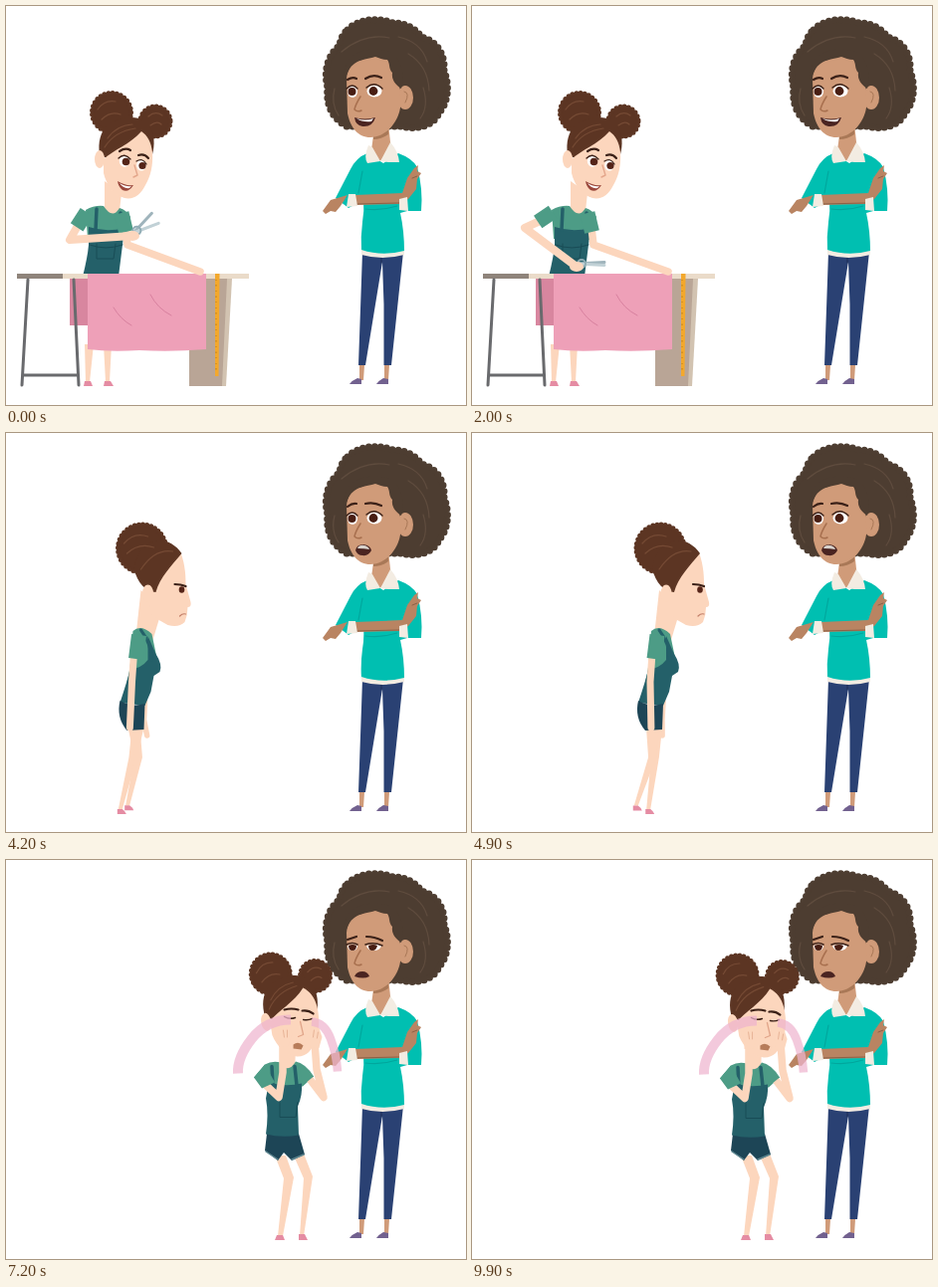
Animation of 462x401 px, one loop 10 s. Source, as an HTML page:

```html
<!DOCTYPE html>
<html lang="en">
<head>
<meta charset="utf-8">
<title>Two women</title>
<style>
html, body { margin: 0; width: 100%; height: 100%; overflow: hidden; background: #fff; }
svg { display: block; width: 462px; height: 401px; }
.line { fill: none; stroke-linecap: round; stroke-linejoin: round; }
.skin { fill: #fcd6bd; }
.limb { fill: none; stroke: #fcd6bd; stroke-linecap: round; stroke-linejoin: round; }
.tan { fill: #d09b79; }
.arm { fill: #b98462; }
.hair { fill: #5c3523; }
.curl { fill: #5c3523; stroke: #5c3523; stroke-width: 5; stroke-linecap: round; stroke-dasharray: 0 4.2; }
.shirt { fill: #4d9c86; }
.sleeve { fill: none; stroke: #4d9c86; stroke-width: 15; }
.apron { fill: #246069; }
.shorts { fill: #1d4556; }
.teal { fill: #00bfb1; }
.cream { fill: #f3ece2; }
.jeans { fill: #2a4173; }
.shoe { fill: #e58ca3; }
.brow { fill: none; stroke: #3b2118; stroke-width: 2.2; stroke-linecap: round; }
.tear { fill: none; stroke: #efb5cf; stroke-opacity: .72; stroke-linejoin: round; }
</style>
</head>
<body>
<svg viewBox="0 0 462 401">
  <defs>
    <g id="girlHead">
      <circle class="curl" cx="106" cy="107" r="19.5"/>
      <circle class="curl" cx="150" cy="116" r="15"/>
      <path class="line" stroke="#754a34" stroke-width="1.2" d="M92 104q7-10 18-8M96 114q9-9 19-5M143 111q7-6 14-1M145 120q7-5 11-1"/>
      <path class="hair" d="M94 150C90 122 107 112 126 112 145 112 152 130 147 149L120 160Z"/>
      <ellipse class="skin" cx="94" cy="154" rx="5" ry="9"/>
      <path class="skin" d="M98 154C107 145 125 139 136 126 142 130 146 137 147 147 148 160 145 172 140 180 135 190 128 195 119 193 108 190 101 180 98 168Z"/>
      <path class="line" stroke="#754a34" stroke-width="1.2" d="M102 133q9-13 25-14M99 142q10-16 31-19"/>
    </g>
  </defs>

  <g id="table">
    <path class="skin" d="M79 340h9l-4 38h-4zM98 340h8l-2 38h-4z"/>
    <path class="shoe" d="M79 377h6l2 5h-9zM99 377h6l3 5h-10z"/>
    <g id="torso">
      <path class="skin" d="M99 176L116 188 114 206Q107 213 99 207Z"/>
      <path class="shirt" d="M80 205Q89 200 98 201 107 215 114 203 121 205 125 212L118 235 82 234Z"/>
      <path class="apron" d="M83 222Q101 228 119 223L117 240 113 272H77Q82 252 83 240Z"/>
      <path class="line" stroke="#246069" stroke-width="3.5" d="M90 225L91 204M115 225L115 208"/>
      <path class="line" stroke="#194c56" stroke-width="1" d="M91 239v15h17l2-15M84 240q16 6 33 0"/>
    </g>
    <g id="tableHead">
      <use href="#girlHead"/>
      <path class="brow" d="M114 146q6-4 11-1M133 150q6-2 10 3"/>
      <g id="eyesOpen">
        <ellipse cx="119" cy="156" rx="5.2" ry="5.8" fill="#fff"/>
        <ellipse cx="136" cy="160" rx="4.8" ry="5.5" fill="#fff"/>
        <circle cx="120.5" cy="156.5" r="3.8" fill="#542418"/>
        <circle cx="137" cy="160.5" r="3.6" fill="#542418"/>
        <path class="brow" style="stroke-width:1.3" d="M113 153q6-6 12 1M131 156q6-4 10 3"/>
      </g>
      <g id="eyesDown">
        <path class="brow" d="M113 157q6 5 11 2M131 161q5 4 9 1"/>
        <path class="line" stroke="#d89e84" d="M113 153q6-3 12 2M131 157q6-2 10 2"/>
      </g>
      <path class="line" stroke="#e4a78c" stroke-width="1.4" d="M129 160l3 10-4 2"/>
      <path fill="#9a473c" d="M112 176q8 5 16 4-5 8-11 5-4-3-5-9"/>
      <path fill="#fff" d="M114 178q7 4 12 3l-2 2q-6 1-10-5"/>
    </g>

    <path fill="#b9a596" d="M184 274h42l-7 108h-35z"/>
    <path fill="#d2c3b1" d="M222 274h5l-6 108h-4z"/>
    <path fill="#d8869f" d="M64 274h20v47H64z"/>
    <path fill="#eadbc9" d="M57 269h187v5H57z"/>
    <path fill="#8f847b" d="M11 269h46v5H11z"/>
    <path class="line" stroke="#696a6d" stroke-width="3" d="M22 275L16 381M68 275L73 381M18 371H72"/>
    <path fill="#eea0b8" d="M82 269H201V345Q165 348 134 346 105 348 82 345Z"/>
    <path class="line" stroke="#d8819f" d="M108 303q7 12 18 18M145 290q7 14 21 21"/>
    <path fill="#f3a82c" d="M210 269h4.5l-1 103h-3.5z"/>
    <path fill="none" stroke="#a76d13" stroke-width="1.5" stroke-dasharray=".6 5" d="M211 275V370"/>

    <path id="farArm" class="limb" stroke-width="7.5"/>
    <path id="farSleeve" class="sleeve"/>
    <g id="scissors">
      <path id="bladeA" class="line" stroke="#9fb4bc" stroke-width="3" d="M0 0L27 0"/>
      <path id="bladeB" class="line" stroke="#c1d1d6" stroke-width="3" d="M0 0L27 0"/>
      <circle cx="4" r="4" fill="none" stroke="#8facb4" stroke-width="2"/>
    </g>
    <path id="nearArm" class="limb" stroke-width="8"/>
    <path id="nearSleeve" class="sleeve"/>
    <ellipse id="nearHand" class="skin" rx="7" ry="5"/>
  </g>

  <g id="walker">
    <path id="farSwing" class="limb" stroke-width="5.5"/>
    <path id="legB" class="skin"/>
    <path id="legA" class="skin"/>
    <path id="shoeB" class="shoe" d="M-3-2H2Q5 0 6 3H-3Z"/>
    <path id="shoeA" class="shoe" d="M-3-2H2Q5 0 6 3H-3Z"/>
    <path class="skin" d="M188 158L209 178 200 208 183 204Z"/>
    <path class="shirt" d="M180 199Q188 192 199 202L204 226 196 246 174 250Q178 235 178 222Z"/>
    <path class="apron" d="M195 204L203 222Q210 233 207 240L201 244 198 260 192 274 167 271Q174 250 177 238 189 236 195 228Z"/>
    <path class="line" stroke="#246069" stroke-width="3" d="M188 198q10 13 11 30"/>
    <path class="shorts" d="M167 269Q179 276 192 272L191 298 174 299Q163 286 167 269Z"/>
    <path id="swing" class="limb" stroke-width="7"/>
    <path id="swingSleeve" class="sleeve"/>
    <circle class="curl" cx="189" cy="116" r="24"/>
    <path class="skin" d="M197 156C205 135 218 121 228 120 233 134 233 146 233 152L238 170Q239 175 235 175 235 183 232 190 226 196 215 193 205 188 197 181Z"/>
    <path class="hair" d="M181 136C187 103 215 101 229 121 219 133 207 145 203 160 194 160 184 151 181 136Z"/>
    <ellipse class="skin" cx="195" cy="161" rx="5.5" ry="8.5"/>
    <path class="line" stroke="#754a34" stroke-width="1.2" d="M171 111q10-12 24-7M174 121q12-11 27-6M188 137q14-21 32-18"/>
    <path class="brow" d="M222 152q6 0 11 2"/>
    <ellipse cx="229" cy="157.5" rx="2.8" ry="3.3" fill="#542418"/>
    <path class="line" stroke="#c37f69" stroke-width="1.2" d="M227 184q3-3 6-2"/>
  </g>

  <g id="woman">
    <path d="M343 24C353 13 374 11 389 17 402 17 412 23 417 31 436 36 441 52 440 65 446 80 444 98 435 107 430 121 412 125 398 121L342 121C328 113 321 100 323 82 318 63 325 47 335 40Q336 30 343 24Z" fill="#4d3d31" stroke="#4d3d31" stroke-width="7" stroke-linecap="round" stroke-dasharray="0 6"/>
    <path class="tan" d="M370 122L384 118 387 146 374 157 367 145Z"/>
    <path fill="#a97857" d="M369 129L384 124 384 129Q377 134 369 134Z"/>
    <path class="jeans" d="M358 247H399L387 361H379.5V300L378 257 361 361H354Z"/>
    <path class="line" stroke="#1c2c55" d="M377 252v6"/>
    <path class="tan" d="M355 361h5l-1 15h-4zM380 361h5l-1 15h-4z"/>
    <path fill="#72618f" d="M353 374l4 1v5h-12q3-4 8-6zM379 374l5 1v5h-12q3-4 7-6z"/>
    <path class="teal" d="M363 148Q352 152 346 164L331 193 344 203 359 195Q360 206 358 217 356 232 357 247 378 253 400 247 400 226 396 208L403 206H417Q419 184 413 162 408 153 394 148L379 158Z"/>
    <path class="cream" d="M357 245q21 7 43 1v4q-22 6-43 0z"/>
    <path class="cream" d="M364 140l4 2 8 14-13 2q-4-6 1-18zM386 137q8 9 9 20l-11 0-8-1z"/>
    <path class="line" stroke="#00a79d" stroke-width="1.2" d="M358 166L354 188M361 204Q377 206 393 201"/>
    <path class="arm" d="M343 190L336 201 331 207 326 206 321 209 318 206 326 195Z"/>
    <path class="arm" d="M350 190L398 188 403 173 410 163 414 160 413 166 417 168 413 174 412 184 404 194 395 199 350 200Z"/>
    <path class="line" stroke="#8d6046" d="M352 199L395 198M413 171l-5 2"/>
    <path class="cream" d="M344 189l7 0 2 12-11 1zM395 194l8-2 1 14-9-1z"/>

    <ellipse class="tan" cx="401" cy="92" rx="8" ry="12"/>
    <path class="line" stroke="#a97857" d="M400 86q6 1 1 11"/>
    <path class="tan" d="M342 73C343 57 358 50 386 50 393 62 397 81 396 102 394 117 381 132 366 132 353 132 346 122 343 108Z"/>
    <path fill="#4d3d31" d="M340 76C337 52 353 42 374 44 396 42 402 67 397 83 391 79 387 74 388 67 384 63 386 58 383 54 378 54 375 52 371 51 361 54 352 54 346 60Q343 66 340 76Z"/>
    <path class="line" stroke="#5f4c3e" stroke-width="1.2" d="M337 46q23-19 48-14M394 31q23 5 29 25M404 48q20 12 21 37M330 83q-4 15 4 27M419 82q6 19-3 31"/>
    <path class="line" stroke="#a8704f" stroke-width="1.5" d="M356 91q-5 8-6 13 3 3 7 1"/>
    <g id="eyesWide">
      <ellipse cx="348" cy="86" rx="5" ry="6" fill="#fff"/>
      <ellipse cx="370" cy="85.5" rx="7.5" ry="6" fill="#fff"/>
      <circle cx="347.5" cy="86" r="4" fill="#481e13"/>
      <circle cx="369" cy="85.5" r="4.4" fill="#481e13"/>
      <path class="brow" style="stroke-width:1.4" d="M342 83q6-6 11 0M362 82q8-7 16 1"/>
    </g>
    <g id="smile">
      <path class="brow" d="M343 74q5-3 9-1M361 73q8-5 16-1"/>
      <path fill="#4a2421" d="M350 112q10 3 21 0-3 10-13 9-7-1-8-9"/>
      <path fill="#fff" d="M352 113q9 3 17 0l-2 3q-9 1-15-3"/>
    </g>
    <g id="shock">
      <path class="brow" d="M343 74q5-4 9-3M361 71q8-2 16 2"/>
      <path fill="#4a2421" d="M351 118q1-6 8-6 7 1 8 6-3 6-9 5-5 0-7-5"/>
      <path fill="#d8d2cc" d="M354 114q5-3 10 1l1 2q-5-1-12-1z"/>
    </g>
    <g id="sad">
      <path d="M343 86q5-3 10 0 0 5-5 5-5 0-5-5M362 86q8-3 15 0-1 5-8 5-6 0-7-5" fill="#fff"/>
      <path d="M344 86q4-2 8 0 0 5-4 5-4 0-4-5M364 86q5-2 9 0-1 5-5 5-4 0-4-5" fill="#481e13"/>
      <path class="brow" style="stroke-width:1.5" d="M342 85q6-3 11 0M361 85q8-3 17 1"/>
      <path class="brow" d="M343 80l9-3M362 77q8 0 16 4"/>
      <path fill="#4a2421" d="M350 117q2-5 8-5 5 0 7 5-6 3-15 0"/>
    </g>
  </g>

  <g id="crying">
    <path class="skin" d="M270 297H281L289 319 278 378H273L279 320ZM288 295H299L308 318 299 378H295L299 320Z"/>
    <path class="shoe" d="M272 377h6l2 5h-10zM294 376h6l3 6h-9z"/>
    <path class="shorts" d="M262 275H294L300 296 287 302 279 294 273 302 260 292Z"/>
    <path class="line" stroke="#5e8791" stroke-width="1.5" d="M261 293l12 8M287 301l12-5"/>
    <g id="sob">
      <path class="skin" d="M277 190h14l-1 23q-7 6-13-1z"/>
      <path class="shirt" d="M260 206Q267 202 276 204 283 216 291 203 301 205 309 218L298 228 263 231 249 219Z"/>
      <path class="apron" d="M264 224Q281 229 297 225 298 237 293 248L294 277Q277 280 261 276 264 256 261 240Z"/>
      <path class="line" stroke="#246069" stroke-width="3.5" d="M268 227L267 208M292 227L290 208"/>
      <path class="line" stroke="#194c56" stroke-width="1" d="M275 244v15h16l2-15"/>
      <g id="cryHead">
        <use href="#girlHead" transform="translate(160 8) rotate(-9 106 106)"/>
        <path class="brow" d="M280 151q7-2 14 0M298 152q6-1 11 3"/>
        <path class="brow" style="stroke-width:1.4" d="M280 158q5 3 11 1M299 161q5 1 9-1"/>
        <path class="line" stroke="#e1a58a" stroke-width="1.3" d="M296 163l3 13-5 2"/>
        <path fill="#b77c5a" d="M289 186q5-4 10 1l-2 4-8-1z"/>
      </g>
      <path id="tearL" class="tear"/>
      <path id="tearR" class="tear"/>
      <path class="limb" stroke-width="7.5" d="M256 222L274 239 278 214 278 184M303 218L319 239 312 211 310 184"/>
      <path class="shirt" d="M260 206L270 224 257 230 249 219ZM294 204L309 218 298 227Z"/>
      <g id="hands">
        <path class="skin" d="M274 189L273 171 277 168 280 171 285 169 287 176 283 188Z"/>
        <path class="skin" d="M305 189L304 174 309 169 314 170 317 179 314 190Z"/>
        <path class="line" stroke="#e8b497" d="M278 172l1 7M282 172l0 7M309 172l-1 7M313 174l-1 6"/>
      </g>
    </g>
  </g>
</svg>
<script>
const $ = id => document.getElementById(id);
const LOOP = 10000, STEP = 100, WALK = 3900, CRY = 6200;
const show = (id, on) => $(id).style.display = on ? '' : 'none';
const move = (id, x, y, more = '') => $(id).setAttribute('transform', `translate(${x} ${y}) ${more}`);
const line = (id, ...pts) => $(id).setAttribute('d', 'M' + pts.map(p => p.join(' ')).join('L'));
const mix = (a, b, k) => a + (b - a) * k;
const toward = (a, b, k) => [mix(a[0], b[0], k), mix(a[1], b[1], k)];

// time, elbow x y, hand x y, blade angle, head x y, lean, far hand x y
const poses = [
  [0,    64, 235, 127, 231, -34, 0, 0, 0, 195, 267],
  [1100, 53, 230,  94, 262, -4, 1, 0, 0, 197, 267],
  [2000, 53, 223, 105, 262, 0, 2, 0, 0, 197, 267],
  [3400, 76, 241, 136, 266, 0, 11, 4, 5, 155, 266],
  [3900, 78, 241, 140, 266, 0, 11, 4, 5, 157, 266]
];

function poseAt(t) {
  const i = Math.max(1, poses.findIndex(p => p[0] >= t));
  const a = poses[i - 1], b = poses[i];
  const k = (t - a[0]) / (b[0] - a[0]);
  const ease = k * k * (3 - 2 * k);
  return a.slice(1).map((v, n) => mix(v, b[n + 1], ease));
}

function cut(t) {
  const [ex, ey, hx, hy, angle, dx, dy, lean, fx, fy] = poseAt(t);
  const near = [77 + lean, 212], elbow = [ex, ey];
  const far = [119 + lean, 214], farElbow = [122 + lean, 240];
  move('tableHead', dx, dy);
  move('torso', lean * 4.5, 0, `skewX(${-lean})`);
  line('nearArm', near, elbow, [hx, hy]);
  line('nearSleeve', [81 + lean, 207], toward(near, elbow, .45));
  line('farArm', far, farElbow, [fx, fy]);
  line('farSleeve', [116 + lean, 208], toward(far, farElbow, .5));
  move('nearHand', hx, hy);
  move('scissors', hx + 1, hy - 3, `rotate(${angle})`);
  const gap = 8 + 5 * Math.cos(t / 400 * Math.PI);
  $('bladeA').setAttribute('transform', `rotate(${-gap})`);
  $('bladeB').setAttribute('transform', `rotate(${gap})`);
  show('eyesOpen', t < 2700);
  show('eyesDown', t >= 2700);
}

// A leg tapers from hip to ankle.
function leg(name, hip, phase) {
  const lift = Math.max(0, Math.cos(phase)) * 4;
  const x = 171 + 13 * Math.sin(phase), y = 378 - lift;
  const knee = mix(hip, x, .4) + 2 + lift * 1.3;
  line('leg' + name, [hip - 6, 296], [hip + 6, 296], [knee + 4, 326], [x + 2, y], [x - 2, y], [knee - 4, 326]);
  move('shoe' + name, x, y + 2);
}

function walk(t) {
  const phase = (t - 4900) / 800 * 2 * Math.PI - .5;
  move('walker', (t - 4900) * .075, 0);
  leg('A', 181, phase);
  leg('B', 185, phase + Math.PI);
  const reach = 4 * Math.sin(phase);
  const shoulder = [182, 207], hand = [178 - reach, 296];
  line('swing', shoulder, [179, 250], hand);
  line('swingSleeve', [186, 203], [183, 227]);
  line('farSwing', [192, 270], [191, 288], [193 + reach, 304]);
}

function weep(t) {
  const s = Math.sin((t - CRY) / 600 * 2 * Math.PI);
  const fall = Math.min(1, (t - CRY + 100) / 500);
  const out = 2 * Math.sin(t / 300 * Math.PI);
  move('sob', 0, s * .6);
  move('cryHead', s * .5, 0);
  move('hands', -s * .5, s * .5);
  const tear = (id, d, width) => {
    $(id).setAttribute('d', d);
    $(id).setAttribute('stroke-width', width);
  };
  const y = mix(167, 215, fall);
  tear('tearL', `M286 161Q${262 - out} 161 ${247 - out} ${mix(166, 180, fall)}T${233 - out} ${y + out}`, 10 + out / 2);
  tear('tearR', `M307 163Q${320 + out} 164 ${326 + out} ${mix(168, 180, fall)}T${333 + out} ${y - 2 - out}`, 8.5 - out / 2);
}

function draw(now) {
  const t = Math.floor(now % LOOP / STEP) * STEP;
  const cutting = t < WALK, crying = t >= CRY, walking = !cutting && !crying;
  show('table', cutting);
  show('walker', walking);
  show('crying', crying);
  show('smile', cutting);
  show('shock', walking);
  show('sad', crying);
  show('eyesWide', !crying);
  if (cutting) cut(t);
  else if (walking) walk(t);
  else weep(t);
}

const start = performance.now();
function tick() {
  draw(performance.now() - start);
  requestAnimationFrame(tick);
}
tick();
</script>
</body>
</html>
```
